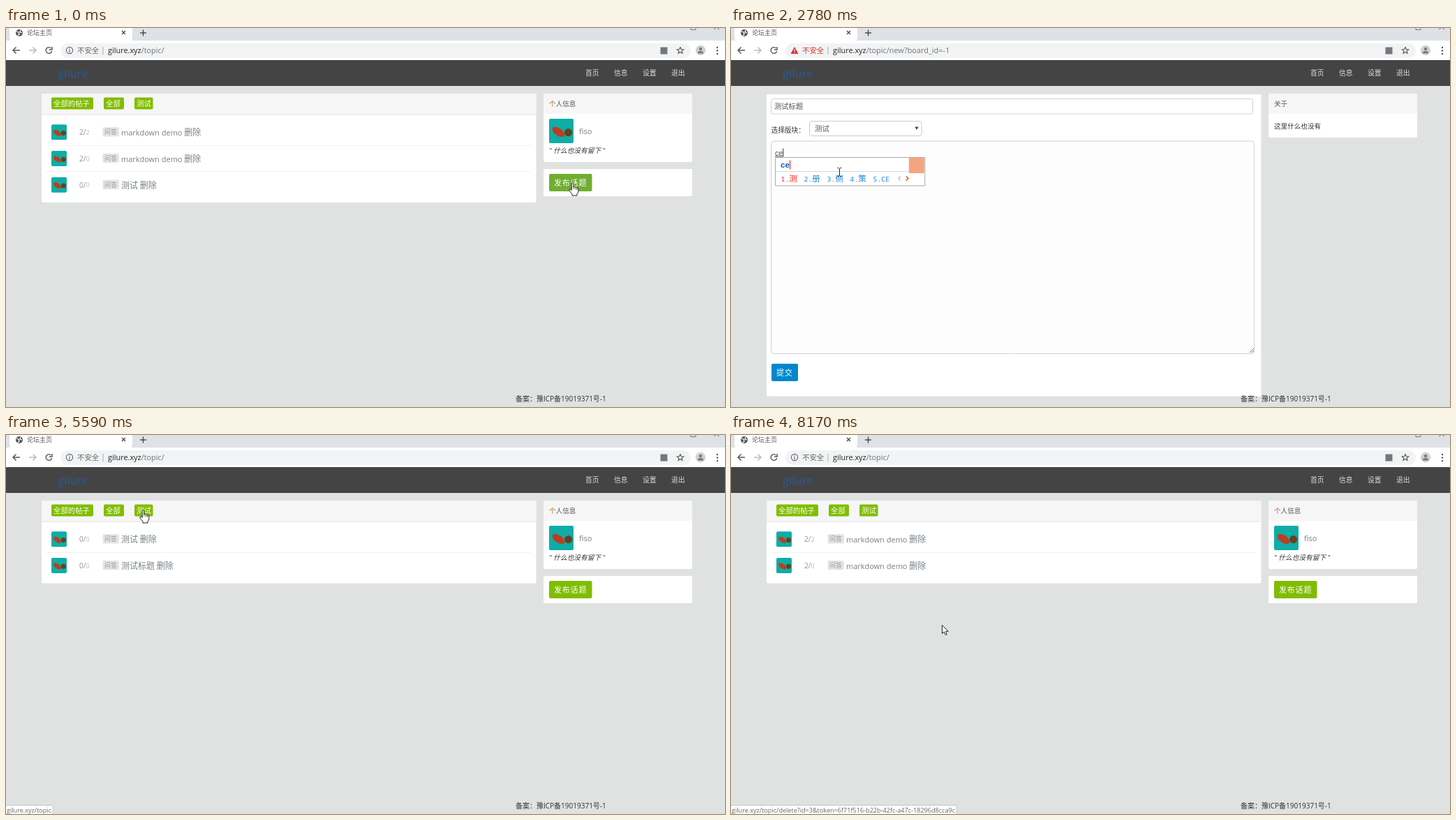
These frames come from a looping animation (1030x543 px, 8.38 s). An HTML page with a canvas:

```html
<!DOCTYPE html>
<html lang="zh">
<head>
<meta charset="utf-8">
<title>论坛主页</title>
<style>
  html, body { margin: 0; width: 100%; height: 100%; overflow: hidden; background: #e0e1e1; }
  canvas { display: block; }
</style>
</head>
<body>
<canvas id="stage" width="1030" height="543"></canvas>
<script>
const ctx = document.getElementById('stage').getContext('2d', { alpha: false });
const LOOP = 8380;
const HOST = 'gilure.xyz';
const UI = '"Open Sans", "Noto Sans CJK SC", "Noto Sans CJK", sans-serif';
const ARIAL = '"Liberation Sans", "Noto Sans CJK SC", "Noto Sans CJK", sans-serif';
const MONO = '"Noto Sans Mono", "Noto Sans CJK SC", "Noto Sans CJK", monospace';
const GREEN = '#80bd01';

const BURSTS = [[190, 1190, 6], [1370, 2360, 6], [2560, 3560, 6], [3760, 4780, 6],
  [4990, 6000, 6], [6160, 7170, 6], [7380, 8170, 5]];

const ROWS = [['2', '2', 'markdown demo 删除'], ['2', '0', 'markdown demo 删除'],
  ['0', '0', '测试 删除'], ['0', '0', '测试标题 删除']];
const deleteLink = id => `${HOST}/topic/delete?id=${id}&token=6f71f516-b22b-42fc-a47c-18296d8cca9c`;

const EVENTS = [
  [0, { page: 'list', rows: ROWS.slice(0, 3), hover: true, status: '', title: '', body: '', ime: null, unsafe: false }],
  [590, { page: 'form', hover: false }],
  [990, { unsafe: true, ime: { field: 'title', raw: 'ceshi', shown: "ce'shi", words: ['测试', '侧室', '测时', '策士', '测'] } }],
  [1190, { title: '测试', ime: null }],
  [1370, { ime: { field: 'title', raw: 'bcti', shown: "bc'ti", words: ['标题', '标体', '表', '标', '彪'] } }],
  [1570, { title: '测试标题', ime: null }],
  [2760, { ime: { field: 'body', raw: 'ce', shown: 'ce', words: ['测', '册', '侧', '策', 'CE'] } }],
  [2960, { ime: { field: 'body', raw: 'ceshi', shown: "ce'shi", words: ['测试', '侧室', '测时', '策士', '测'] } }],
  [3360, { body: '测试', ime: null }],
  [4160, { page: 'list', rows: ROWS, unsafe: false }],
  [5190, { status: HOST + '/topic' }],
  [5390, { rows: ROWS.slice(2) }],
  [5990, { rows: ROWS }],
  [6560, { status: '' }],
  [6760, { status: deleteLink(4) }],
  [7160, { rows: ROWS.slice(0, 3), status: '' }],
  [7570, { status: deleteLink(3) }],
  [7970, { rows: ROWS.slice(0, 2) }]
];

const POINTER = [
  [0, 811, 221, 'hand'], [390, 811, 221, 'hand'], [590, 780, 210, 'arrow'], [990, 138, 115, 'beam'],
  [1570, 138, 115, 'beam'], [1960, 190, 144, 'arrow'], [2160, 190, 144, 'arrow'], [2360, 180, 180, 'beam'],
  [2760, 155, 206, 'beam'], [3560, 155, 206, 'beam'], [3760, 110, 400, 'beam'], [3960, 92, 486, 'hand'],
  [4160, 92, 486, 'arrow'], [4600, 92, 486, 'arrow'], [4990, 150, 230, 'arrow'], [5190, 196, 107, 'hand'],
  [5590, 196, 107, 'hand'], [5790, 93, 107, 'hand'], [6350, 93, 107, 'hand'], [6560, 180, 210, 'arrow'],
  [6760, 227, 261, 'hand'], [7170, 227, 261, 'hand'], [7380, 215, 223, 'hand'], [7780, 215, 223, 'hand'],
  [7970, 268, 255, 'arrow'], [8170, 302, 272, 'arrow'], [LOOP, 302, 272, 'arrow']
];

function snap(t) {
  let tick = 0;
  for (const [first, last, steps] of BURSTS) {
    if (t < first) break;
    const gap = (last - first) / (steps - 1);
    tick = first + gap * Math.min(steps - 1, Math.floor((t - first) / gap));
  }
  return tick;
}

function rect(x, y, w, h, fill, radius = 0, stroke) {
  ctx.beginPath();
  ctx.roundRect(x, y, w, h, radius);
  if (fill) { ctx.fillStyle = fill; ctx.fill(); }
  if (stroke) { ctx.strokeStyle = stroke; ctx.lineWidth = 1; ctx.stroke(); }
}

function circle(x, y, r, fill) {
  ctx.beginPath();
  ctx.arc(x, y, r, 0, Math.PI * 2);
  if (fill) { ctx.fillStyle = fill; ctx.fill(); }
}

function line(points, color, width = 1) {
  ctx.beginPath();
  points.forEach(([x, y]) => ctx.lineTo(x, y));
  ctx.strokeStyle = color;
  ctx.lineWidth = width;
  ctx.stroke();
}

// Draws text centred on cy and returns its right edge; Latin runs may have their own size.
function text(str, x, cy, size, color, { latin = size, font = UI, style = '', gap = '0px' } = {}) {
  ctx.fillStyle = color;
  ctx.letterSpacing = gap;
  for (const run of str.match(/[\x00-\xff]+|[^\x00-\xff]+/g) || []) {
    ctx.font = `${style} ${run.charCodeAt(0) < 256 ? latin : size}px ${font}`;
    ctx.fillText(run, x, cy + size * 0.38);
    x += ctx.measureText(run).width;
  }
  ctx.letterSpacing = '0px';
  return x;
}

function avatar(x, y, s) {
  rect(x, y, s, s, '#0fada6', 2);
  ctx.beginPath();
  ctx.ellipse(x + s * 0.38, y + s * 0.54, s * 0.29, s * 0.15, 0.6, 0, Math.PI * 2);
  ctx.fillStyle = '#bd3d20';
  ctx.fill();
  circle(x + s * 0.79, y + s * 0.56, s * 0.16, '#68401d');
}

function button(label, x, y, w, fill) {
  rect(x, y, w, 25, fill, 2);
  text(label, x + 7, y + 12.5, 11, '#fff', { gap: '0.8px' });
}

function browser(s) {
  rect(0, 0, 1030, 19, '#dee1e6');
  rect(5, -8, 176, 28, '#fff', 6);
  rect(0, 18, 1030, 28, '#fff');
  circle(19, 7, 5, '#51565b');
  line([[15, 5], [18, 6], [19, 9], [17, 11]], '#fff', 1.3);
  line([[21, 3], [20, 6], [23, 7]], '#fff', 1.3);
  text('论坛主页', 30, 7, 9, '#555');
  line([[166, 4], [171, 9]], '#444', 1.3);
  line([[171, 4], [166, 9]], '#444', 1.3);
  line([[192, 7], [201, 7]], '#444', 1.4);
  line([[196.5, 2.5], [196.5, 11.5]], '#444', 1.4);
  line([[981, 0], [981, 2.5], [988, 2.5], [988, 0]], '#777');
  line([[1014, 2], [1017, 0]], '#777');
  line([[1022, 2], [1019, 0]], '#777');

  line([[20, 32], [10, 32]], '#555', 1.5);
  line([[14.5, 27.5], [10, 32], [14.5, 36.5]], '#555', 1.5);
  line([[33, 32], [43, 32]], '#bbb', 1.5);
  line([[38.5, 27.5], [43, 32], [38.5, 36.5]], '#bbb', 1.5);
  ctx.beginPath();
  ctx.arc(61.5, 32, 4.3, 0.3, 5.4);
  ctx.strokeStyle = '#555';
  ctx.lineWidth = 1.5;
  ctx.stroke();
  line([[66, 27], [66, 31], [62, 31]], '#555', 1.5);

  rect(78, 22, 903, 21, '#f1f3f4', 10.5);
  if (s.unsafe) {
    ctx.beginPath();
    [[91, 27], [96.5, 37], [85.5, 37]].forEach(p => ctx.lineTo(...p));
    ctx.fillStyle = '#d0352b';
    ctx.fill();
    rect(90.4, 30.5, 1.2, 3, '#fff');
    rect(90.4, 34.6, 1.2, 1.2, '#fff');
  } else {
    circle(91, 32, 4.6);
    ctx.strokeStyle = '#5f6368';
    ctx.lineWidth = 1.1;
    ctx.stroke();
    rect(90.4, 31.5, 1.2, 3.2, '#5f6368');
    rect(90.4, 29.3, 1.2, 1.2, '#5f6368');
  }
  text('不安全', 102, 32, 10.4, s.unsafe ? '#d0352b' : '#666');
  rect(138.5, 27, 1, 11, '#aaa');
  const end = text(HOST, 146, 32, 10.9, '#222');
  text(s.page === 'form' ? '/topic/new?board_id=-1' : '/topic/', end, 32, 10.9, '#70757a');

  rect(937.5, 27.5, 10, 10, '#73777b');
  const star = Array.from({ length: 11 }, (_, i) => {
    const a = i * Math.PI / 5, r = i % 2 ? 2.2 : 5;
    return [966 + r * Math.sin(a), 32.3 - r * Math.cos(a)];
  });
  line(star, '#555', 1.1);
  circle(995, 32, 7.2, '#cfd1d4');
  circle(995, 30, 2.2, '#777b80');
  rect(991, 33, 8, 3.5, '#777b80', [3, 3, 0, 0]);
  [28, 32.5, 37].forEach(y => circle(1019, y, 1.2, '#555'));

  rect(0, 46, 1030, 37, '#444');
  text('gilure', 74, 65, 15.8, '#2d5685', { style: '600' });
  ['首页', '信息', '设置', '退出'].forEach((label, i) => text(label, 830 + i * 41, 64.5, 9.8, '#ddd'));
}

function sidePanel(bottom) {
  rect(770, 94, 213, bottom - 94, '#fff', 2);
  rect(770, 94, 213, 29, '#f6f6f6', [2, 2, 0, 0]);
}

function listPage(s) {
  const pitch = 37.7;
  rect(51, 94, 708.5, 43 + pitch * s.rows.length, '#fff', 2);
  rect(51, 94, 708.5, 30, '#f6f6f6', [2, 2, 0, 0]);
  rect(51, 123.5, 708.5, 1, '#e3e3e3');
  [['全部的帖子', 65, 60], ['全部', 140, 29], ['测试', 184, 26.5]].forEach(([label, x, w]) => {
    rect(x, 99.5, w, 17, GREEN, 2);
    text(label, x + 3, 108, 10.4, '#fff');
  });
  s.rows.forEach(([replies, views, title], i) => {
    const y = 149.3 + i * pitch;
    avatar(65, y - 11, 22);
    const end = text(replies + '/', 105, y, 10, '#8f8f98');
    text(views, end, y + 0.3, 9, '#b9b9b9');
    rect(138.5, y - 7.3, 23.5, 13.5, '#e5e5e5', 2);
    text('问答', 141, y - 0.4, 9, '#999');
    text(title, 165, y + 0.3, 12, '#778087', { latin: 11 });
    if (i < s.rows.length - 1) rect(57, Math.round(y + 18.2), 695, 1, '#f0f0f0');
  });

  sidePanel(192);
  const end = text('个', 778, 108.5, 9.6, '#a8642c');
  text('人信息', end, 108.5, 9.6, '#51585c');
  avatar(778, 130, 35);
  text('fiso', 821, 147.5, 11, '#778087');
  text('" 什么也没有留下 "', 778, 175, 9.7, '#333', { style: 'italic' });
  rect(770, 202, 213, 39, '#fff', 2);
  button('发布话题', 778, 209, 61.5, s.hover ? '#6fae31' : GREEN);
}

function formPage(s) {
  rect(51, 95, 708.5, 432.5, '#fff');
  rect(57.5, 101.5, 690, 21.5, '#fff', 3, '#d2d2d2');
  text('选择版块：', 57.5, 146.5, 9.7, '#333');
  rect(112.5, 133.5, 160.5, 21, '#fff', 3, '#ccc');
  text('测试', 120, 144.5, 10.4, '#555');
  ctx.beginPath();
  [[263.5, 141.5], [268.5, 141.5], [266, 146]].forEach(p => ctx.lineTo(...p));
  ctx.fillStyle = '#444';
  ctx.fill();
  rect(57.5, 162, 692, 304.5, '#fdfdfd', 4, '#d0d0d0');
  line([[743, 465], [749, 459]], '#777');
  line([[746, 465], [749, 462]], '#777');
  button('提交', 58, 481, 38, '#08c');

  sidePanel(157);
  text('关于', 778, 108.5, 9.6, '#51585c');
  text('这里什么也没有', 778, 140, 9.6, '#333');

  if (!s.body && s.ime?.field !== 'body') {
    text('文章支持 Markdown 语法, 请注意标记代码', 63, 178.5, 10.7, '#999', { font: ARIAL });
  }
  const titleEnd = text(s.title, 62, 112, 10.3, '#555', { font: ARIAL });
  const bodyEnd = text(s.body, 63, 178.5, 10.7, '#555', { font: ARIAL });
  if (s.ime) {
    const inTitle = s.ime.field === 'title';
    inputMethod(s.ime, inTitle ? titleEnd : bodyEnd, inTitle ? 112 : 178.5, inTitle ? 10.3 : 10.7);
  }
}

function inputMethod({ raw, shown, words }, x, cy, size) {
  const end = text(raw, x, cy, size, '#555', { font: ARIAL });
  rect(x, cy + 5, end - x, 1, '#555');
  rect(end, cy - 6, 1, 12, '#333');

  const left = Math.round(x) + 0.5, top = Math.round(cy + 6) + 0.5;
  const widths = words.map(w => 12 + (w < 'a' ? 5.9 : 11.5) * w.length + 9.5);
  const tail = left + 8 + widths.reduce((a, b) => a + b, 0);
  const right = tail + 41;
  rect(left, top, right - left, 40.5, '#fff', 0, '#aaa');
  rect(left + 1, top + 19.5, right - left - 25, 1, '#d8d8d8');
  const caret = text(shown, left + 7.5, top + 10, 11.6, '#0b5cc0', { font: ARIAL, style: 'bold' });
  rect(caret, top + 4, 1.3, 13, '#e33');
  rect(right - 23, top + 0.5, 22, 22, '#f4a580');

  let wx = left + 8;
  words.forEach((word, i) => {
    text(`${i + 1}.${word}`, wx, top + 30, 11.5, i ? '#1b87d6' : '#ee2222', { latin: 9.8, font: MONO });
    wx += widths[i];
  });
  const my = top + 30;
  line([[tail + 6, my - 3], [tail + 3, my], [tail + 6, my + 3]], '#bbb', 1.2);
  line([[tail + 14, my - 3], [tail + 17, my], [tail + 14, my + 3]], '#e8532c', 1.6);
}

const ARROW = new Path2D('M0 0V12L2.8 9.5L4.8 14L6.8 13.1L4.9 8.8H8.7Z');
const HAND = new Path2D('M-1.3 1Q0 -1 1.3 1V6Q3 5 3.8 6.6Q5.4 5.8 6.2 7.3Q8 6.8 8.4 8.7V12Q8.4 15 6.5 16V18.5H-.5V16.5Q-3 14 -4.8 10.5Q-4.3 8.6 -2.6 9.7L-1.3 11Z');

function pointer(t) {
  const i = POINTER.findLastIndex(p => p[0] <= t);
  const [t0, x0, y0, kind] = POINTER[i];
  const [t1, x1, y1] = POINTER[Math.min(i + 1, POINTER.length - 1)];
  const k = t1 > t0 ? (t - t0) / (t1 - t0) : 0;
  const ease = k * k * (3 - 2 * k);
  ctx.save();
  ctx.translate(Math.round(x0 + (x1 - x0) * ease) + 0.5, Math.round(y0 + (y1 - y0) * ease) + 0.5);
  if (kind === 'beam') {
    line([[-3, -6], [-1, -6], [0, -5], [1, -6], [3, -6]], '#222');
    line([[0, -5], [0, 5]], '#222');
    line([[-3, 6], [-1, 6], [0, 5], [1, 6], [3, 6]], '#222');
  } else {
    const shape = kind === 'hand' ? HAND : ARROW;
    ctx.fillStyle = '#fff';
    ctx.strokeStyle = '#222';
    ctx.lineWidth = 1;
    ctx.fill(shape);
    ctx.stroke(shape);
    if (kind === 'hand') [[1.3, 6], [3.8, 6.8], [6.2, 7.5]].forEach(([x, y]) => line([[x, y], [x, y + 3]], '#222', 0.8));
  }
  ctx.restore();
}

function statusBubble(label) {
  ctx.font = `9.1px ${UI}`;
  rect(-4, 530.5, ctx.measureText(label).width + 7, 16, '#fff', 3, '#c4c4c4');
  text(label, 1, 538, 9.1, '#666');
}

function draw() {
  const t = performance.now() % LOOP;
  const tick = snap(t);
  const state = Object.assign({}, ...EVENTS.filter(([at]) => at <= tick).map(e => e[1]));
  rect(0, 0, 1030, 543, '#e0e1e1');
  browser(state);
  (state.page === 'form' ? formPage : listPage)(state);
  text('备案：豫ICP备19019371号-1', 730, 531.5, 10, '#333');
  if (state.status) statusBubble(state.status);
  pointer(tick);
  requestAnimationFrame(draw);
}
requestAnimationFrame(draw);
</script>
</body>
</html>
```
